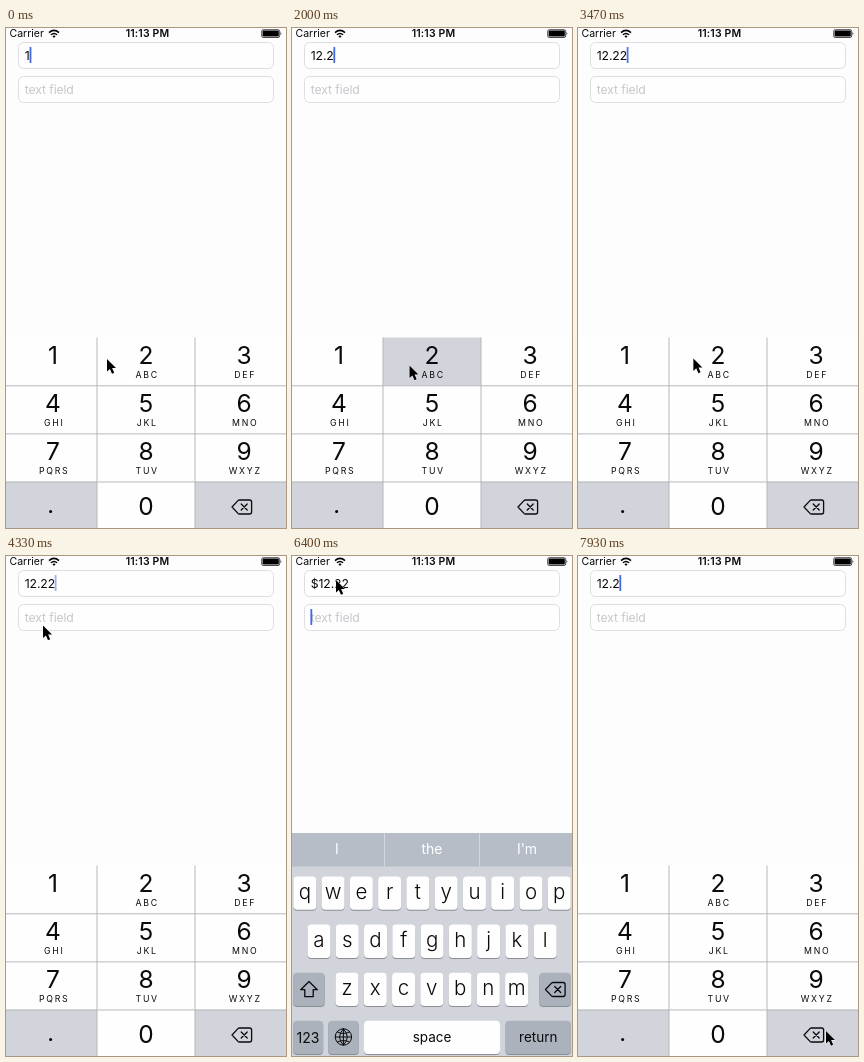
Recreate the animation shown at these times as an HTML page. Size 280 px wide and 500 px high, loop 8 s.

```html
<!DOCTYPE html>
<html lang="en">
<head>
<meta charset="utf-8">
<title>Currency field</title>
<style>
  html, body { margin: 0; width: 100%; height: 100%; overflow: hidden; background: #fefdfe; }
  svg { display: block; width: 100vw; height: 100vh; }
  text { font-family: Inter, Roboto, sans-serif; fill: #0a0a0c; }
  .mid { text-anchor: middle; }
  .status { font-size: 10.5px; }
  .field { fill: #fefefe; stroke: #dedee2; }
  .input { font-size: 12.25px; letter-spacing: -.12px; }
  .hint { fill: #c7c7cd; }
  .digit { font-size: 24.5px; }
  .sub { font-size: 8.75px; letter-spacing: 1.7px; }
  .letter { font-size: 20.5px; font-weight: 300; }
  .word { font-size: 13.5px; }
  .guess { font-size: 14px; fill: #fff; }
  .icon { fill: none; stroke: #0a0a0c; stroke-width: 1.3; stroke-linejoin: round; stroke-linecap: round; }
</style>
</head>
<body>
<svg id="stage" viewBox="0 0 280 500">
  <defs>
    <g id="erase" class="icon">
      <path d="M-10 0 L-4 -6.4 Q-3.3 -7 -2.4 -7 H7.6 Q9.6 -7 9.6 -5 V5 Q9.6 7 7.6 7 H-2.4 Q-3.3 7 -4 6.4 Z"/>
      <path d="M-.8 -3 L5.2 3 M5.2 -3 L-.8 3"/>
    </g>
  </defs>
  <rect width="280" height="500" fill="#fefdfe"/>

  <text class="status" x="3.5" y="9.4">Carrier</text>
  <g fill="none" stroke="#000" stroke-width="1.5">
    <path d="M43 4.6 Q48 .2 53 4.6"/>
    <path d="M44.9 6.8 Q48 4.1 51.1 6.8"/>
  </g>
  <path d="M46.4 8 Q48 6.8 49.6 8 L48 9.9 Z"/>
  <text class="status mid" x="141.5" y="9.4" font-weight="600" letter-spacing=".15">11:13 PM</text>
  <rect x="255.7" y="1.7" width="18" height="7.8" rx="1.6" fill="none" stroke="#000" stroke-width=".7"/>
  <rect x="256.6" y="2.6" width="16.2" height="6" rx=".8"/>
  <path d="M274.6 4 Q276.2 5.6 274.6 7.2 Z"/>

  <rect class="field" x="12.5" y="14.5" width="255" height="26" rx="5"/>
  <rect class="field" x="12.5" y="48.5" width="255" height="26" rx="5"/>
  <text class="input" id="amount" x="18.7" y="31.6"></text>
  <text class="input hint" x="18.7" y="65.6">text field</text>
  <rect id="caret" width="1.8" height="16" rx=".6" fill="#4069e4"/>

  <g id="pad"></g>
  <g id="qwerty"></g>

  <path id="pointer" d="M0 0 V12.6 L2.9 9.9 L5 14.8 L7.2 13.8 L5.1 9.1 H9 Z"
        fill="#000" stroke="#fff" stroke-width="1" stroke-linejoin="round" paint-order="stroke"/>
</svg>
<script>
const LOOP = 8000;
const GREY = '#d1d5db', WHITE = '#fefefe', DARK = '#abb2bc';
const $ = id => document.getElementById(id);

function add(parent, tag, attrs, content) {
  const el = document.createElementNS('http://www.w3.org/2000/svg', tag);
  for (const name in attrs) el.setAttribute(name, attrs[name]);
  if (content) el.textContent = content;
  parent.append(el);
  return el;
}
const label = (parent, cls, x, y, content) =>
  add(parent, 'text', { class: cls + ' mid', x, y }, content);

// Number pad
const pad = $('pad'), keys = {};
const edges = [0, 91, 189, 280], centers = [47, 140, 238];
const subs = ['', 'ABC', 'DEF', 'GHI', 'JKL', 'MNO', 'PQRS', 'TUV', 'WXYZ'];
[...'123456789.0<'].forEach((name, i) => {
  const col = i % 3, row = Math.floor(i / 3), y = 309.5 + row * 48.1;
  const idle = name === '.' || name === '<' ? GREY : WHITE;
  const box = add(pad, 'rect', {
    x: edges[col], y, width: edges[col + 1] - edges[col], height: 48.2, fill: idle
  });
  keys[name] = { box, idle, down: idle === GREY ? WHITE : GREY };
  if (name === '<') add(pad, 'use', { href: '#erase', x: 236, y: 479 });
  else if (name === '.') add(pad, 'circle', { cx: 44.6, cy: 483.5, r: 1.5 });
  else label(pad, 'digit', centers[col], row === 3 ? 487 : 336 + row * 48.2, name);
  if (subs[i]) label(pad, 'sub', centers[col] + 1.2, 349.6 + row * 48.1, subs[i]);
});
add(pad, 'path', {
  d: 'M91 309.5V500M189 309.5V500M0 357.8H280M0 405.9H280M0 454H280',
  stroke: '#b0b2b6', 'stroke-width': .9
});

// Letter keyboard
const qwerty = $('qwerty');
add(qwerty, 'rect', { y: 277, width: 280, height: 34, fill: '#b6bdc6' });
add(qwerty, 'rect', { y: 310.5, width: 280, height: 189.5, fill: GREY });
add(qwerty, 'path', { d: 'M92.5 277V310.5M187.5 277V310.5', stroke: '#d3d7dd' });
['I', 'the', "I'm"].forEach((word, i) => label(qwerty, 'guess', 45 + i * 95, 297.5, word));

function cap(x, y, width, fill) {
  add(qwerty, 'rect', { x, y: y + 1, width, height: 33.3, rx: 4, fill: '#8a8d92' });
  add(qwerty, 'rect', { x, y, width, height: 33.3, rx: 4, fill });
}
['qwertyuiop', 'asdfghjkl', 'zxcvbnm'].forEach((row, r) => {
  const y = 320.5 + r * 48.1, first = [12.8, 27, 55][r];
  [...row].forEach((ch, i) => {
    const x = first + i * 28.27;
    cap(x - 11.5, y, 23, WHITE);
    label(qwerty, 'letter', x, y + 22.3, ch);
  });
});
cap(1.2, 416.7, 31.5, DARK);
cap(247.3, 416.7, 31.5, DARK);
cap(1.2, 464.8, 30, DARK);
cap(36.2, 464.8, 30.5, DARK);
cap(72, 464.8, 136, WHITE);
cap(213.5, 464.8, 65.3, DARK);
add(qwerty, 'path', { class: 'icon', d: 'M17 425.5L25.3 433.7H21.2V440.7H12.8V433.7H8.7Z' });
add(qwerty, 'use', { href: '#erase', x: 263.5, y: 433.5 });
add(qwerty, 'path', {
  class: 'icon', 'stroke-width': 1, style: 'stroke-width:1',
  d: 'M43.2 481a8.2 8.2 0 1 0 16.4 0a8.2 8.2 0 1 0 -16.4 0H59.6M51.4 472.8V489.2' +
     'M51.4 472.8Q43.6 481 51.4 489.2Q59.2 481 51.4 472.8M45.3 476Q51.4 479 57.5 476M45.3 486Q51.4 483 57.5 486'
});
label(qwerty, 'guess', 16, 486.5, '123').style.fill = '#0a0a0c';
label(qwerty, 'word', 140, 485.8, 'space');
label(qwerty, 'word', 246.3, 485.8, 'return');

// time, text, pressed key
const states = [
  [0, '1', ''], [130, '1', '2'], [330, '12', ''], [930, '12', '.'],
  [1070, '12.', ''], [1730, '12.', '2'], [1870, '12.2', ''], [2000, '12.2', '2'],
  [2270, '12.22', ''], [2470, '12.22', '2'], [2670, '12.22', ''], [2800, '12.22', '2'],
  [3000, '12.22', ''], [3200, '12.22', '2'], [3330, '12.22', ''], [5270, '$12.22', ''],
  [6530, '12.22', ''], [7670, '12.22', '<'], [7870, '12.2', '']
];
const caretX = [0, 23.6, 31, 33.8, 41.4, 48.7];

// time, x, y; the pointer rests between equal points
const path = [
  [0, 101, 331], [330, 101, 331], [900, 47, 472], [1130, 47, 472],
  [1700, 117.5, 337.5], [3400, 117.5, 337.5], [4130, 37, 69.5], [4330, 37, 69.5],
  [4950, 32.5, 56.5], [5670, 32.5, 56.5], [6250, 44, 24], [6530, 44, 24],
  [7070, 207, 332.5], [7400, 239, 434], [7600, 248, 475], [LOOP, 248, 475]
];

// time, opacity
const blink = [
  [0, 1], [2460, 1], [2600, 0], [2670, 0], [2790, 1], [3460, 1], [3600, 0], [3850, 0],
  [4000, 1], [4270, 1], [4400, 0], [4750, 0], [4900, 1], [5700, 1], [5870, 0], [6120, 0],
  [6270, 1], [6529, 1], [6530, 0], [6599, 0], [6600, 1], [7110, 1], [7240, 0], [7460, 0],
  [7600, 1], [LOOP, 1]
];

function find(table, t) {
  let i = 0;
  while (i + 1 < table.length && table[i + 1][0] <= t) i++;
  return i;
}

function linear(table, t) {
  const i = Math.min(find(table, t), table.length - 2);
  const [a, b] = [table[i], table[i + 1]];
  return a[1] + (b[1] - a[1]) * (t - a[0]) / (b[0] - a[0]);
}

function slope(i, axis) {
  const a = path[i - 1], b = path[i], c = path[i + 1];
  if (!a || !c || a[axis] === b[axis] || b[axis] === c[axis]) return 0;
  return (c[axis] - a[axis]) / (c[0] - a[0]);
}

function smooth(t, axis) {
  const i = Math.min(find(path, t), path.length - 2);
  const a = path[i], b = path[i + 1], span = b[0] - a[0], u = (t - a[0]) / span;
  const s = u * u * (3 - 2 * u);
  return a[axis] + (b[axis] - a[axis]) * s +
    span * u * (1 - u) * ((1 - u) * slope(i, axis) - u * slope(i + 1, axis));
}

const amount = $('amount'), caret = $('caret'), pointer = $('pointer');

function draw(t) {
  const [, value, pressed] = states[find(states, t)];
  const second = value[0] === '$';
  if (amount.textContent !== value) amount.textContent = value;
  for (const name in keys) {
    const key = keys[name];
    key.box.setAttribute('fill', name === pressed ? key.down : key.idle);
  }
  pad.style.display = second ? 'none' : '';
  qwerty.style.display = second ? '' : 'none';
  caret.setAttribute('x', second ? 18.4 : caretX[value.length]);
  caret.setAttribute('y', second ? 53 : 19);
  caret.setAttribute('opacity', linear(blink, t));
  pointer.setAttribute('transform', `translate(${smooth(t, 1)} ${smooth(t, 2)})`);
}

const start = performance.now();
function tick() {
  draw((performance.now() - start) % LOOP);
  requestAnimationFrame(tick);
}
tick();
</script>
</body>
</html>
```
